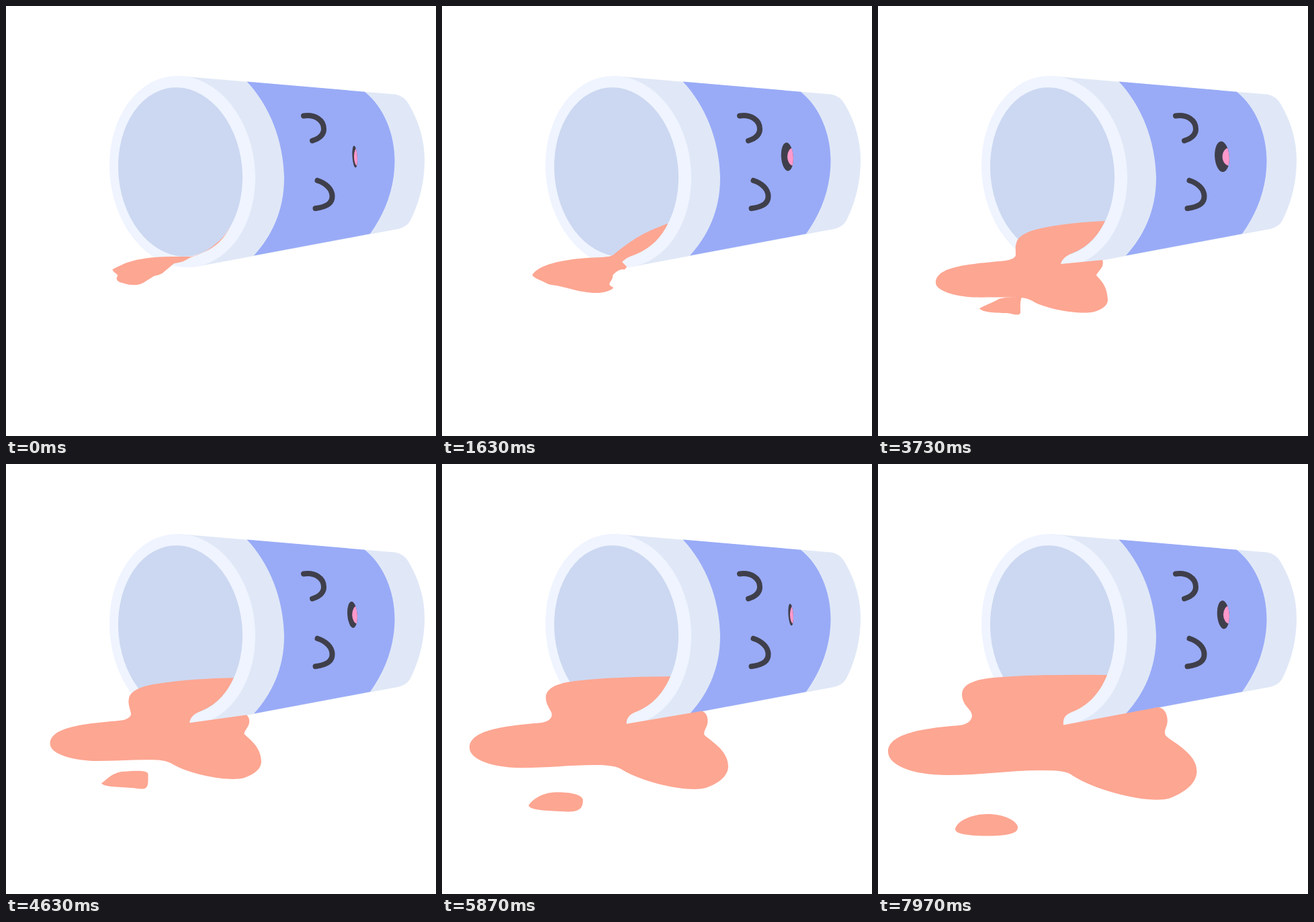
These frames come from a looping animation (640x640 px, 8 s). An HTML page:

```html
<!DOCTYPE html>
<html lang="en">
<head>
<meta charset="utf-8">
<title>Spilled cup</title>
<style>
  html, body { margin: 0; width: 100%; height: 100%; overflow: hidden; background: #fff; }
  svg { display: block; width: 100%; height: 100%; }
  .eye { fill: none; stroke: #3f3f4b; stroke-width: 8; stroke-linecap: round; }
  .spill { fill: #fda692; }
</style>
</head>
<body>
<svg viewBox="0 0 640 640">
  <defs>
    <ellipse id="mouth" cy="224.3" />
    <clipPath id="mouthClip"><use href="#mouth" /></clipPath>
  </defs>

  <path fill="#e0e8f7" d="M256 104L573 131C585 131 594 136 600 147C615 173 623 200 623 229C623 265 614 295 602 319C598 326 592 330 583 332L283 388L270 389Z" />
  <path fill="#99abf7" d="M358.500 112.500L534 127.700C562 150 578.500 190 578.500 230C578.500 270 565 307 542 339L369 371.500C395 343 414 305 414 256C413 200 392 148 358.500 112.500Z" />
  <ellipse fill="#eff4ff" cx="262.5" cy="246.5" rx="108" ry="143" transform="rotate(-6.6 262.5 246.5)" />
  <ellipse fill="#ccd8f1" cx="259.5" cy="247" rx="92.1" ry="126.1" transform="rotate(-6 259.5 247)" />

  <path class="eye" d="M443 163.500C460 161 473 170 473 183C473 191 467 197 456 200.500" />
  <path class="eye" d="M463.500 259.700C477 264 485.500 273 485.500 283C486 293 478 299 460.500 301.300" />
  <use href="#mouth" fill="#3f3f4b" />
  <g clip-path="url(#mouthClip)"><ellipse id="tongue" fill="#ff99cc" cx="523" cy="224.3" ry="13.5" /></g>

  <path class="spill" id="puddle" />
  <path class="spill" id="drop" />
</svg>
<script>
const LOOP = 8000;
const $ = id => document.getElementById(id);
const mix = (a, b, u) => a + (b - a) * u;

// Spread of the liquid over time: [ms, progress]
const spread = [
  [0, 0], [830, .07], [1630, .168], [2530, .307], [3370, .446], [3730, .503], [4200, .58],
  [5030, .706], [5870, .818], [6770, .916], [7570, .982], [7970, 1]
];

// Poses share one command structure and are keyed by progress.
const puddlePoses = [
  [0, `M335 326 C326 346 311 360 293 367 C287 370 281 372 275 374 L264 380
    C258 382 253 382 249 384 C245 388 240 391 236 395 C232 399 228 400 220 402
    C216 405 210 408 206 411 C199 416 188 416.5 176 413 C169 411 166 410 165 407
    C163 404 168 403 165 399 C162 397 159 395 158.5 392 C172 386 185 374 245 373
    C255 373 262 373 268 373 C272 373 276 373 280 372 C288 369 296 366 304 360.5
    C316 351 326 344 335 326Z`],
  [.168, `M336.5 323.5 C326 345 311 360 290 369 C279 373 274 375 268 381 L275 388
    C274 390 273 391 271 392.5 C267 391 260 394 254 401 C255 411 242 413 255 419
    C254 422 248 424 243 425.5 C228 429 210 426 191 421 C183 419 176 417 170 416
    C165 415 160 415 156 413 C150 409 136 405 134.5 400.5 C140 390 165 376 237 374
    C242 373.5 247 373 250 372.5 C252 372 253 371 255 370.5 C266 361 276 354 288 346
    C304 336 322 329 336.5 323.5Z`],
  [.503, `M338 320 C326 345 311 359 289 368 C279 372 274 377 272 384 L334 378
    C335 381 335 383 334 387 C331 393 326 397 325 401 C330 407 341 415 342 437
    C342 445 335 451 322 455 C302 460 257 452 235 442 C228 438 222 434 210 434
    C184 433 160 434 140 433.5 C107 431 86 422 86 412 C86 386 142 384 190 379
    C201 377 205 374 205 370 C205 364 204 357 206 353 C208 342 224 335 240 331.5
    C268 325 302 321.5 338 320Z`],
  [1, `M341 314 C330 342 312 360 289 369 C279 373 275 378 276 388.5 L417 362
    C428 363 434 378 429 391 C427 396 426 400 428 404 C436 413 474.5 430 474.5 457
    C474.5 474 459 488 434 497.5 C406 506 330 489 290 464 C280 456 261 456 240 456
    C198 456 155 463 103 463 C50 463 15 448 15 428 C15 401 69 393 121 389
    C135 388 145 378 137 367 C133 362 125 355 125 343 C125 326 148 319 185 317
    C230 314 290 313 341 314Z`]
];
const dropPoses = [
  [.503, `M151 450 C160 445 172 441 180 436 C190 433 205 433.5 214 433 C211 440 212 450 212 456
    C211 462 204 459 192 457 C175 457 155 456 151 450Z`],
  [.647, `M142 475.5 C150 470 158 459 175 458 C190 457 211.5 455 211.5 462 C211.5 468 212 477 210 480
    C207 486 200 483.5 190 482.5 C170 481 145 481 142 475.5Z`],
  [1, `M115 543 C117 532 138 521 163 521 C188 521 206 531 208 540 C208 545 206 548 197 550.5
    C188 553 175 553.5 160 553.5 C130 553 114 550 115 543Z`]
];

// Finds the pair of keys around x and the position between them.
function between(keys, x) {
  let i = 1;
  while (i < keys.length - 1 && x > keys[i][0]) i++;
  const [x0, a] = keys[i - 1], [x1, b] = keys[i];
  return [a, b, (x - x0) / (x1 - x0)];
}

function morph(poses, progress) {
  const [from, to, u] = between(poses, progress);
  const goal = to.match(/[\d.]+/g);
  let i = 0;
  return from.replace(/[\d.]+/g, n => mix(+n, +goal[i++], u).toFixed(2));
}

function drawMouth(t) {
  const open = (1 - Math.cos(2 * Math.PI * (t + 235) / 6340)) / 2;
  const left = 515.7 - 17 * open, right = 522.8, cx = (left + right) / 2;
  const mouth = $('mouth');
  mouth.setAttribute('cx', cx);
  mouth.setAttribute('rx', (right - left) / 2);
  mouth.setAttribute('ry', 16.2 + 7.8 * open);
  mouth.setAttribute('transform', `rotate(-4 ${cx} 224.3)`);
  $('tongue').setAttribute('rx', 5 + 6.3 * open);
}

function draw(t) {
  const progress = Math.min(1, mix(...between(spread, t)));
  $('puddle').setAttribute('d', morph(puddlePoses, progress));
  $('drop').setAttribute('d', progress > .3 ? morph(dropPoses, progress) : '');
  drawMouth(t);
}

const start = performance.now();
function tick() {
  draw((performance.now() - start) % LOOP);
  requestAnimationFrame(tick);
}
tick();
</script>
</body>
</html>
```
